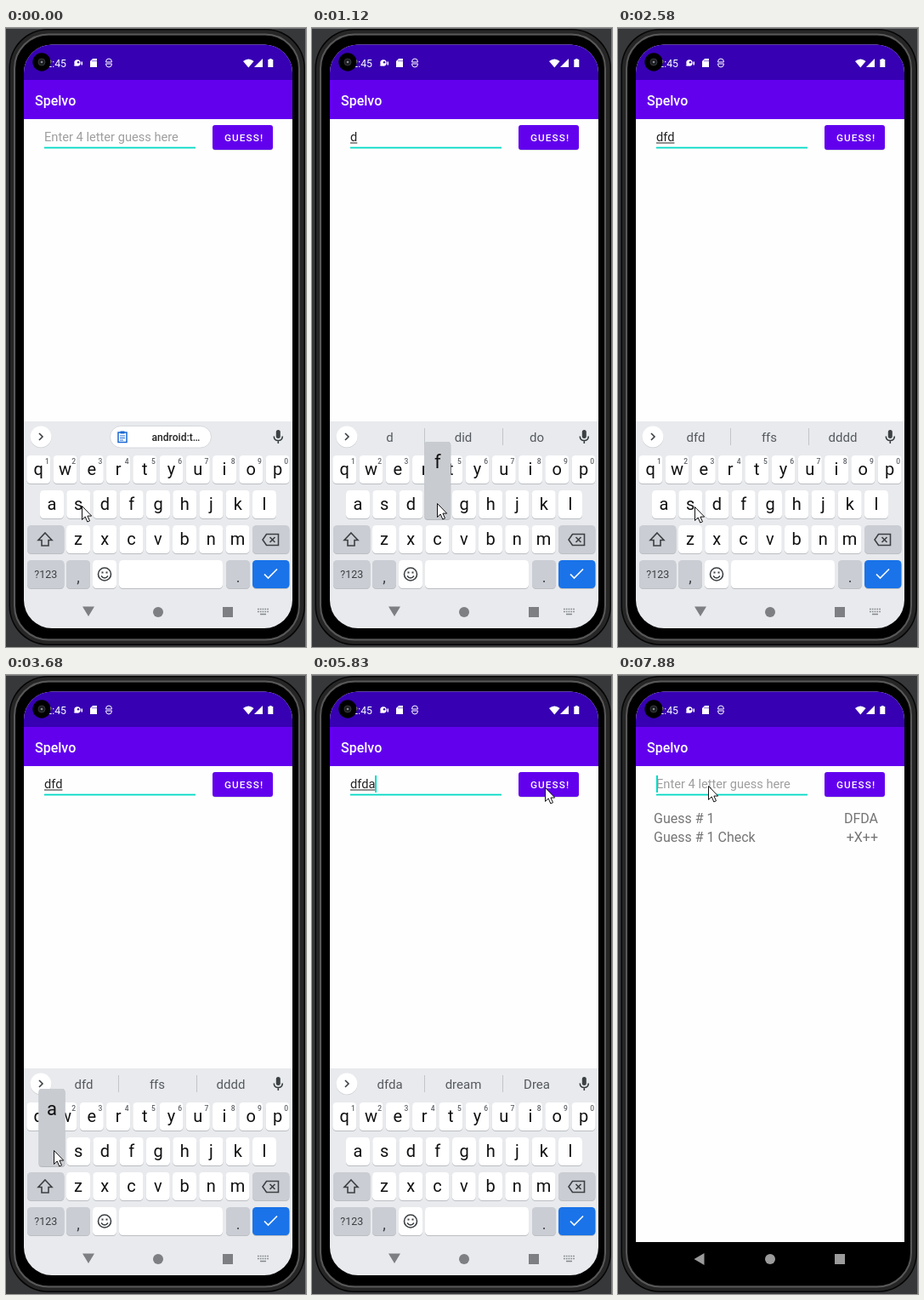
Recreate the animation shown at these times as an HTML page. Size 353 by 727 pixels, loop 8000 ms.

```html
<!DOCTYPE html>
<html lang="en">
<head>
<meta charset="utf-8">
<title>Word guessing app</title>
<style>
html, body { margin: 0; width: 100%; height: 100%; overflow: hidden; background: #37383a }
svg { display: block; font-family: Roboto, sans-serif }
text { white-space: pre }
.mid { text-anchor: middle }
.end { text-anchor: end }
.line { fill: none; stroke: #3c4043; stroke-width: 1.6 }
.result { font-size: 16px; fill: #757575 }
</style>
</head>
<body>
<svg width="353" height="727" viewBox="0 0 353 727">
  <defs>
    <clipPath id="screen"><rect x="21" y="19.500" width="316" height="685.500" rx="33"/></clipPath>
  </defs>

  <!-- Phone body -->
  <path d="M0 .5h352.500V727" fill="none" stroke="#77787a"/>
  <rect x="3.500" y="1" width="348.500" height="724" rx="46" fill="#050505"/>
  <g fill="none">
    <rect x="8" y="5.500" width="339.500" height="715" rx="42" stroke="#262626" stroke-width="6"/>
    <rect x="10" y="7.500" width="335" height="711" rx="40" stroke="#585858" stroke-width="2"/>
  </g>
  <rect x="12" y="9.500" width="331" height="707" rx="38" fill="#000"/>

  <g clip-path="url(#screen)">
    <rect x="21" y="19" width="316" height="647" fill="#fefefe"/>
    <rect x="21" y="19" width="316" height="43" fill="#3700b3"/>
    <rect x="21" y="61" width="316" height="46" fill="#6200ee"/>
    <text x="34" y="91" font-size="16" font-weight="500" fill="#fff">Spelvo</text>

    <!-- Status bar -->
    <text class="end" x="71" y="46" font-size="12.3" fill="#fff">2:45</text>
    <g fill="#fff">
      <circle cx="84" cy="41" r="3.700"/>
      <path d="M79.500 44l2-1.500 1 2.500zM88.500 39.500h1.500v4h-1.500z"/>
      <circle cx="85" cy="40.300" r="1.200" fill="#3700b3"/>
      <path d="M102 36h5v10h-8v-7z"/>
      <path d="M102 37.500v2m2-2v2m2-2v2" stroke="#3700b3" stroke-width=".7"/>
      <path d="M279 39q6.300-5 12.600 0L285.300 46.500z"/>
      <path d="M302 36v10h-10z"/>
      <path d="M308.300 37h1.700v-1h2.600v1h1.700v9h-6z"/>
    </g>
    <path d="M117.500 40q0-4 3.500-4t3.500 4zM117.500 42q0 4 3.500 4t3.500-4z" fill="none" stroke="#fff"/>

    <!-- Guess form -->
    <text id="field" x="45" y="133.300" font-size="14.650"></text>
    <rect id="compose" x="45" y="134.500" height="1" fill="#222"/>
    <rect x="45" y="139.700" width="178" height="1.800" fill="#03dac5"/>
    <rect id="caret" y="118" width="2" height="20" fill="#03dac5"/>
    <rect x="243" y="115" width="71" height="29" rx="3" fill="#000" opacity=".12"/>
    <rect x="243" y="114" width="71" height="29" rx="3" fill="#6200ee"/>
    <rect id="ripple" x="243" y="114" width="71" height="29" rx="3" fill="#fff"/>
    <text x="257" y="133" font-size="11.8" font-weight="500" letter-spacing="1.05" fill="#fff">GUESS!</text>

    <g id="after">
      <g class="result">
        <text x="42" y="174">Guess # 1</text>
        <text x="306" y="174" class="end">DFDA</text>
        <text x="42" y="195.500">Guess # 1 Check</text>
        <text x="306" y="195.500" class="end">+X++</text>
      </g>
      <g fill="#9b9b9b">
        <path d="M89.500 686l12-7v14z"/>
        <circle cx="179" cy="686" r="6"/>
        <rect x="255" y="680" width="12" height="12"/>
      </g>
    </g>

    <g id="board">
      <rect x="21" y="462" width="316" height="244" fill="#e8eaed"/>
      <circle cx="41" cy="480.700" r="12.500" fill="#c9cccf"/>
      <circle cx="41" cy="480" r="12.500" fill="#fff"/>
      <path class="line" d="M39 476l4 4-4 4"/>
      <g fill="#3c4043">
        <rect x="317.800" y="472" width="5" height="10" rx="2.500"/>
        <path class="line" d="M315.300 479.500q0 5 5 5t5-5M320.300 484.500v3.500"/>
      </g>
      <g id="chip">
        <rect x="122.500" y="467.500" width="119" height="25.500" rx="12.700" fill="#fff" stroke="#d5d8dc"/>
        <path d="M132 475h10v11.500h-10z" fill="none" stroke="#1967d2" stroke-width="1.500"/>
        <path d="M134.500 473.500h5v3h-5z" fill="#1967d2"/>
        <path d="M134 479h6m-6 2.500h6m-6 2.500h4" stroke="#1967d2"/>
        <text x="171.500" y="485" font-size="12.100" font-weight="500" fill="#222">android:t…</text>
      </g>
      <g id="words" class="mid" font-size="15" fill="#55595e">
        <path d="M132.500 470v20M224.500 470v20" stroke="#c2c5c9"/>
        <text x="91.500" y="486"></text>
        <text x="178" y="486"></text>
        <text x="264.500" y="486"></text>
      </g>
      <g id="keys" class="mid"></g>

      <!-- Key symbols -->
      <path class="line" d="M46 593l8 8.500h-4v6.500h-8v-6.500h-4z"/>
      <path class="line" d="M306.500 594.500h14v13h-14l-4.500-6.500zM310.500 598l6 6m0-6l-6 6"/>
      <circle class="line" cx="116" cy="641.500" r="7.500"/>
      <path class="line" d="M112 643.500q4 5 8 0"/>
      <path d="M112.500 638.500h2v2h-2zM117.500 638.500h2v2h-2z" fill="#3c4043"/>
      <path d="M304 641.500l4.500 4.500 10.500-10.500" fill="none" stroke="#fff" stroke-width="1.700"/>

      <g fill="#7d7f82">
        <path d="M90 679.500h14l-7 11.500z"/>
        <circle cx="179" cy="686" r="6"/>
        <rect x="255" y="680" width="12" height="12"/>
      </g>
      <path d="M296 682.500h13M296 685.500h13" stroke="#85878a" stroke-width="1.700" stroke-dasharray="1.700 1.100"/>
      <path d="M299 688.500h7" stroke="#85878a" stroke-width="1.500"/>

      <g id="popup">
        <rect x="-15.500" y="486" width="31" height="92" rx="4" fill="#b4b7bb"/>
        <rect x="-15.500" y="486" width="31" height="91" rx="4" fill="#c8cbd0"/>
        <text class="mid" y="517" font-size="22" fill="#111"></text>
      </g>
    </g>
  </g>

  <!-- Camera -->
  <circle cx="42" cy="40" r="10.700"/>
  <circle cx="42" cy="40" r="4" fill="#1c1e21" stroke="#34373b"/>
  <circle cx="42" cy="40" r="1.300" fill="#85898f"/>

  <path id="mouse" d="M.5.5v16l3.700-3.500 2.600 6 2.700-1.200-2.600-5.700h4.800z" fill="#fff" stroke="#111"/>
</svg>
<script>
const LOOP = 8000, TICK = 135, SUBMIT = 5950, KEY_GAP = 31.25;
const $ = id => document.getElementById(id);

function key(x, y, w, label, { fill = '#fff', size = 20, hint = '', ink = '#111', drop = 0 } = {}) {
  const mid = x + w / 2;
  $('keys').insertAdjacentHTML('beforeend', `
    <rect x="${x}" y="${y + 1}" width="${w}" height="33" rx="4.5" fill="#bbbec2"/>
    <rect x="${x}" y="${y}" width="${w}" height="33" rx="4.5" fill="${fill}"/>
    <text x="${mid}" y="${y + 16.5 + drop + size * 0.34}" font-size="${size}" fill="${ink}">${label}</text>
    <text x="${mid + 10}" y="${y + 9.5}" font-size="8.5" font-weight="500" fill="#5f6368">${hint}</text>`);
}

const center = {};
[['qwertyuiop', 38.3, 502], ['asdfghjkl', 54, 543], ['zxcvbnm', 85, 584]].forEach(([row, x0, y], r) =>
  [...row].forEach((c, i) => {
    center[c] = x0 + i * KEY_GAP;
    key(center[c] - 14, y, 28, c, { hint: r ? '' : (i + 1) % 10 });
  }));

const gray = { fill: '#cacdd3', size: 12.5, ink: '#3c4043' };
const dot = { ...gray, size: 18, drop: 3 };
key(25, 584, 43.5, '', gray);
key(290, 584, 43.5, '', gray);
key(25, 625, 43.5, '?123', gray);
key(71, 625, 28, ',', dot);
key(102, 625, 28, '');
key(133, 625, 122, '');
key(259, 625, 28, '.', dot);
key(290, 625, 43.5, '', { fill: '#1a73e8' });

// Letter, press time, release time
const presses = [['d', 545, 650], ['f', 1100, 1240], ['d', 1800, 1930], ['a', 3400, 3780]];
const suggestions = [[], ['d', 'did', 'do'], ['df', 'of', 'do'],
  ['dfd', 'ffs', 'dddd'], ['dfda', 'dream', 'Drea']];

// Pointer: time, x, y
const path = [
  [0, 89, 561], [135, 89, 561], [270, 119, 561], [810, 119, 561], [1080, 147, 558],
  [1350, 147, 558], [1650, 118, 560], [2000, 118, 560], [2560, 90, 562], [3100, 90, 562],
  [3240, 58, 560], [3400, 56, 558], [4050, 56, 558], [4455, 235, 199], [4600, 268, 140],
  [4860, 274, 115], [5130, 276, 131], [5270, 274, 132], [6750, 274, 132], [7150, 190, 136],
  [7425, 106, 130], [LOOP, 106, 130]];

function pointerAt(t) {
  const i = path.findIndex(p => p[0] > t);
  const [t0, x0, y0] = path[i - 1], [t1, x1, y1] = path[i];
  const k = (t - t0) / (t1 - t0);
  return [x0 + (x1 - x0) * k, y0 + (y1 - y0) * k].map(Math.round);
}

const show = (id, on) => $(id).style.display = on ? '' : 'none';
const field = $('field'), words = $('words').querySelectorAll('text');

function draw(now) {
  const t = now % LOOP;
  const sent = t >= SUBMIT;
  const typed = sent ? [] : presses.filter(p => t >= p[2]);
  const value = typed.map(p => p[0]).join('');

  field.textContent = value || 'Enter 4 letter guess here';
  field.setAttribute('fill', value ? '#222' : '#9e9e9e');
  const width = value ? field.getComputedTextLength() : 0;
  $('compose').setAttribute('width', width);

  const edited = sent ? SUBMIT : typed.length ? typed.at(-1)[2] : -770;
  $('caret').setAttribute('x', Math.floor(45 + width));
  show('caret', (t - edited + 80) % 1000 < 500);

  show('chip', !value);
  show('words', value);
  words.forEach((w, i) => w.textContent = suggestions[value.length][i] || '');

  const pressed = presses.find(p => t >= p[1] && t < p[2]);
  show('popup', pressed);
  if (pressed) {
    $('popup').setAttribute('transform', `translate(${center[pressed[0]]})`);
    $('popup').lastElementChild.textContent = pressed[0];
  }

  show('board', t < SUBMIT + 100);
  show('after', sent);
  $('ripple').setAttribute('opacity', sent ? 0.2 * Math.max(0, Math.min(1, (6600 - t) / 370)) : 0);

  // The pointer is refreshed in coarse ticks
  const tick = Math.floor((t + 8) / TICK) * TICK;
  $('mouse').setAttribute('transform', `translate(${pointerAt(tick)})`);
}

let start;
function loop(now) {
  start ??= now;
  draw(now - start);
  requestAnimationFrame(loop);
}
draw(0);
requestAnimationFrame(loop);
</script>
</body>
</html>
```
